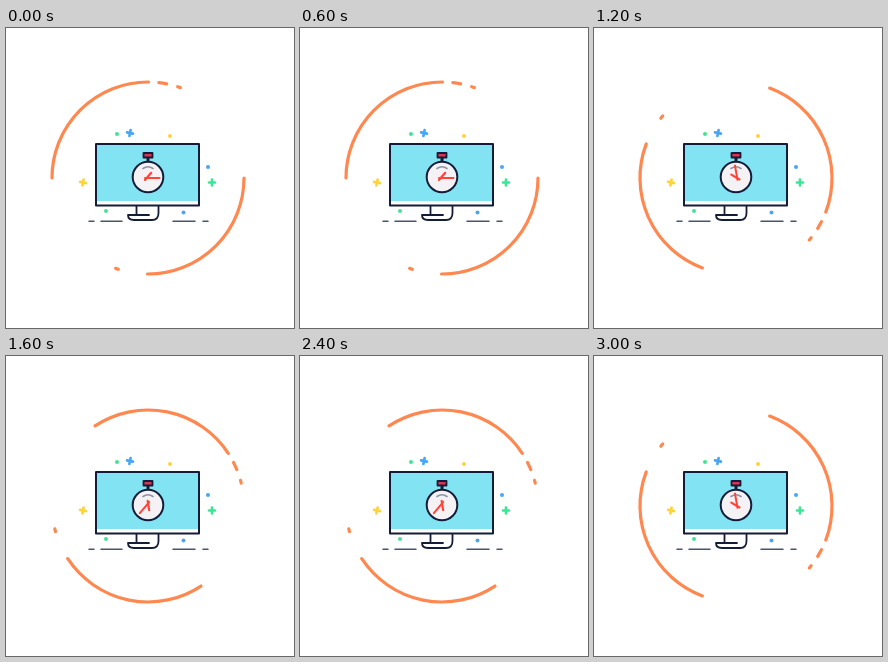
Write an HTML page with a canvas that moves like this. It is 288 px wide and 300 px high and loops after 3030 ms.

```html
<!DOCTYPE html>
<html lang="en">
<head>
<meta charset="utf-8">
<title>Stopwatch on a monitor</title>
<style>
  html, body { margin: 0; width: 100%; height: 100%; overflow: hidden; background: #fff; }
  canvas { display: block; width: 288px; height: 300px; }
</style>
</head>
<body>
<canvas id="stage"></canvas>
<script>
const LOOP = 3030;
const NAVY = '#141d38', ORANGE = '#ff8850', RED = '#ff4538';
const BLUE = '#46a6f7', GREEN = '#40e497', YELLOW = '#ffd43b';

// Ring and hand rotation in degrees for each held pose.
const POSES = {
  A: { ring: 0, hand: 0 },
  B: { ring: 56.5, hand: 130 },
  C: { ring: 83.5, hand: 195 },
  D: { ring: 110.5, hand: 260 }
};
// One pose per 200 ms.
const SEQUENCE = 'ABDABCDABCDABBCD';

const canvas = document.getElementById('stage');
const ratio = window.devicePixelRatio || 1;
canvas.width = 288 * ratio;
canvas.height = 300 * ratio;
const ctx = canvas.getContext('2d');
ctx.scale(ratio, ratio);
ctx.lineCap = ctx.lineJoin = 'round';

const rad = degrees => degrees * Math.PI / 180;

function stroke(path, color, width) {
  ctx.strokeStyle = color;
  ctx.lineWidth = width;
  ctx.stroke(new Path2D(path));
}

function fill(path, color) {
  ctx.fillStyle = color;
  ctx.fill(new Path2D(path));
}

function at(x, y, degrees, draw) {
  ctx.save();
  ctx.translate(x, y);
  ctx.rotate(rad(degrees));
  draw();
  ctx.restore();
}

function disc(x, y, r, color) {
  ctx.beginPath();
  ctx.arc(x, y, r, 0, 2 * Math.PI);
  ctx.fillStyle = color;
  ctx.fill();
}

function drawRing(angle) {
  const arc = (from, to) => {
    ctx.beginPath();
    ctx.arc(0, 0, 96, rad(from), rad(to));
    ctx.stroke();
  };
  at(142, 150, angle, () => {
    ctx.strokeStyle = ORANGE;
    ctx.lineWidth = 3.2;
    arc(180, 270.3);
    arc(276.5, 281.2);
    arc(288, 289.7);
    arc(0, 90.3);
    arc(108, 109.7);
  });
}

function drawSparkles() {
  const plus = (x, y, tilt, color) =>
    at(x, y, tilt, () => stroke('M-3 0H3M0-3V3', color, 2.7));
  plus(124, 105, 12, BLUE);
  plus(77, 154.5, 12, YELLOW);
  plus(206, 154.5, 0, GREEN);
  disc(111, 106, 2, GREEN);
  disc(164, 108, 2, YELLOW);
  disc(202, 139, 2, BLUE);
  disc(100, 183, 2, GREEN);
  disc(177.5, 184.5, 2, BLUE);
}

function drawMonitor() {
  stroke('M83 193.2H88M95 193.2H116M167 193.2H189M197 193.2H202', '#4c5468', 1.5);
  stroke('M130.5 178V187M143 187H122Q122 192 128 192H146Q152.5 192 152.5 185V178', NAVY, 1.8);
  fill('M90 116H193V177.5H90Z', '#fff');
  fill('M90 116H193V173H90Z', '#82e4f3');
  stroke('M90 116H193V177.5H90Z', NAVY, 2);
}

function drawStopwatch(angle) {
  stroke('M142 130V134', NAVY, 3);
  fill('M137.5 125H146.5V129.5H137.5Z', '#d9354c');
  stroke('M137.5 125H146.5V129.5H137.5Z', NAVY, 1.8);
  disc(142, 149, 15.3, '#f4f2f4');
  stroke('M126.7 149a15.3 15.3 0 1 0 30.6 0a15.3 15.3 0 1 0 -30.6 0Z', NAVY, 2);
  stroke('M137 140.5Q142 137 147 140.5', '#8a94a5', 1.6);
  at(142, 149, angle, () => {
    stroke('M-3 1H11.5', RED, 2);
    stroke('M-3 3L3.2-4.2', RED, 2.2);
  });
}

function render(now) {
  const time = now % LOOP;
  const pose = POSES[SEQUENCE[Math.floor(time / 200)]];
  ctx.fillStyle = '#fff';
  ctx.fillRect(0, 0, 288, 300);
  drawRing(pose.ring);
  drawSparkles();
  drawMonitor();
  drawStopwatch(pose.hand);
}

const start = performance.now();
function tick() {
  render(performance.now() - start);
  requestAnimationFrame(tick);
}
tick();
</script>
</body>
</html>
```
